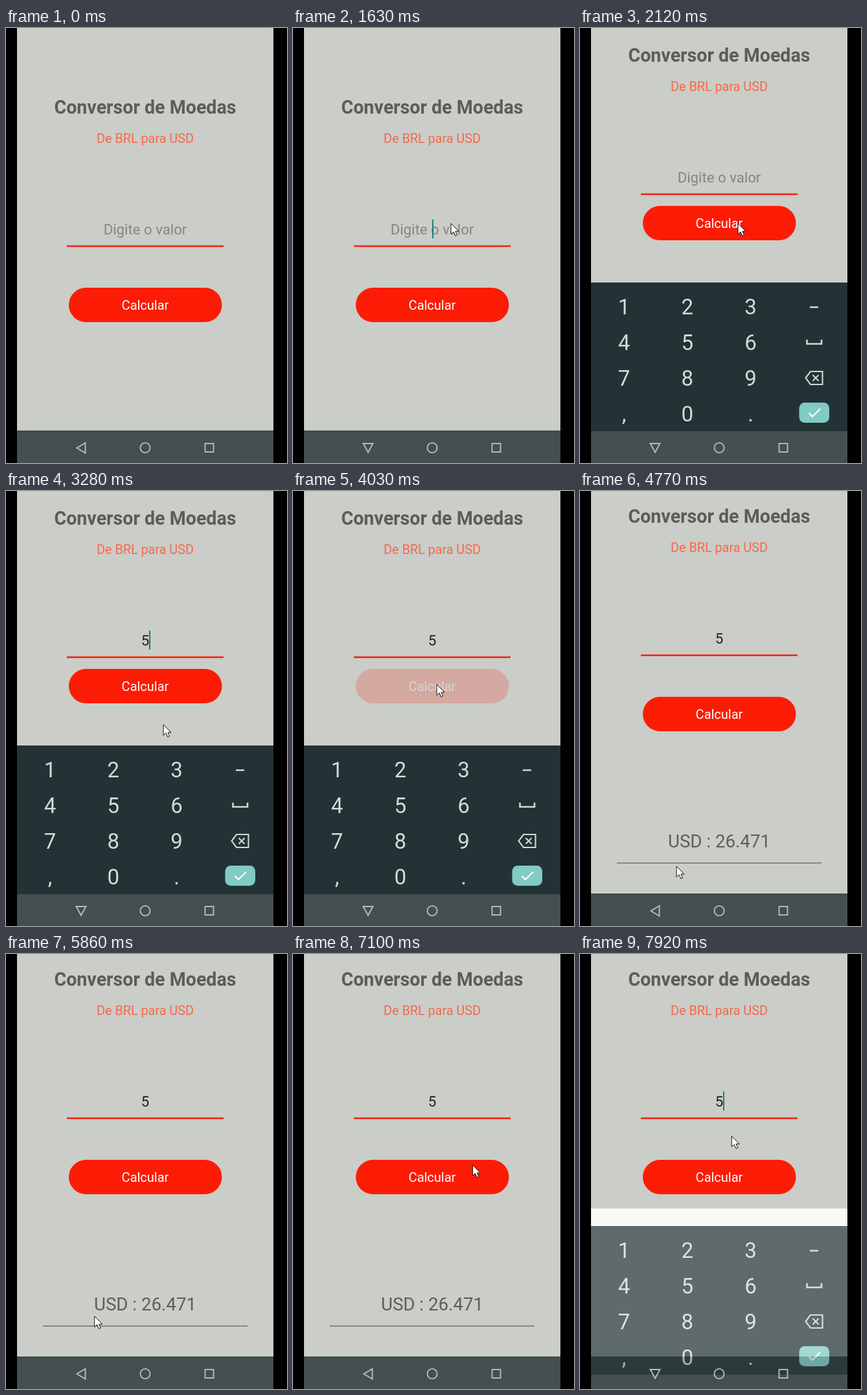
An HTML page for the animation above (7990 ms loop, 434x670 px).

```html
<!DOCTYPE html>
<html lang="pt-BR">
<head>
<meta charset="utf-8">
<title>Conversor de Moedas</title>
<style>
  html, body { margin: 0; height: 100%; overflow: hidden; background: #000; }
  svg { display: block; width: 434px; height: 670px; font-family: Roboto, sans-serif; text-anchor: middle; }
  #keys { font-size: 33px; fill: #d5dcda; }
  .icon { fill: none; stroke: #b4bdbb; stroke-width: 1.9; }
  .key { fill: none; stroke: #d0d7d5; stroke-width: 2.6; }
</style>
</head>
<body>
<svg viewBox="0 0 434 670">
  <clipPath id="phone"><rect x="17" width="396" height="670"/></clipPath>
  <g clip-path="url(#phone)">
    <rect width="434" height="670" fill="#cacdc8"/>
    <g id="form">
      <text x="215" y="132" font-size="28.6" font-weight="700" fill="#5b5d5a">Conversor de Moedas</text>
      <text x="215" y="177" font-size="19.8" fill="#f7694b">De BRL para USD</text>
      <text id="value" x="215" y="318" font-size="22.2"></text>
      <path d="M94 336H336" stroke="#f41f0d" stroke-width="2.4"/>
      <rect id="caret" y="295" width="2" height="29" fill="#17807a"/>
    </g>
    <g id="button">
      <rect x="97" width="236.5" height="53" rx="26.5" fill="#fc1c06"/>
      <text x="215" y="34" font-size="20" fill="#fff">Calcular</text>
    </g>
    <g id="result">
      <text x="215" font-size="27.7" fill="#5d5f5c">USD : 26.471</text>
      <path d="M57 24.5H373" stroke="#858784" stroke-width="2"/>
    </g>
    <rect id="blank" y="392" width="434" height="228" fill="#f8faf7"/>
    <rect y="620" width="434" height="50" fill="#434f50"/>
    <path d="M0 620.5H434" stroke="#344142"/>
    <g id="keyboard">
      <rect y="392" width="434" height="229" fill="#233335"/>
      <rect y="621" width="434" height="50" fill="#444f50"/>
      <rect id="press" x="117" y="457" width="97" height="55" rx="4" fill="#fff" opacity=".15"/>
      <g id="keys"></g>
      <path class="key" d="M355 430H368M350.5 480v6.5h22.5v-6.5"/>
      <path class="key" d="M348.5 539l7.5-10h18.5v20h-18.5zM359.5 534.5l9 9m0-9l-9 9" style="stroke-width:2.1"/>
      <rect x="338.5" y="577" width="46.5" height="31" rx="8.5" fill="#80cbc4"/>
      <path d="M353.5 593l5.5 5.5 12-12" fill="none" stroke="#fff" stroke-width="2.2"/>
    </g>
    <g class="icon">
      <path id="back"/>
      <circle cx="215" cy="646.5" r="7.6"/>
      <rect x="307.5" y="640" width="13" height="13"/>
    </g>
  </g>
  <path id="pointer" d="M0 0V16.5l4-3.6 2.8 6.2 2.7-1.2-2.7-5.8h5.2z" fill="#fff" stroke="#111"/>
</svg>
<script>
const LOOP = 7990;
const TYPED = 3000, SOLVED = 4225, CLOSING = 4260, CLOSED = 4500, REOPEN = 7835;

const el = id => document.getElementById(id);
const show = (id, on) => el(id).setAttribute('visibility', on ? 'visible' : 'hidden');
const move = (id, x, y) => el(id).setAttribute('transform', `translate(${x} ${y})`);
const ramp = (t, start, length) => Math.min(1, Math.max(0, (t - start) / length));
const smooth = k => k * k * (3 - 2 * k);
const within = (t, a, b) => t >= a && t < b;

// The pointer glides from stop to stop: leaving time, travel time, target.
const glides = [
  [110, 770, 244, 301],   // input
  [2180, 350, 170, 555],  // keypad
  [2530, 140, 173, 494],  // key 5
  [2960, 470, 265, 318],
  [3430, 190, 222, 298],  // button
  [4560, 210, 149, 578],  // result, then sweeps below it
  [4770, 110, 125, 558],
  [4880, 450, 263, 558],
  [5330, 470, 125, 558],
  [5800, 340, 263, 558],
  [6200, 450, 331, 450],
  [6650, 800, 241, 240],  // input
  [7770, 170, 234, 282]
];

function pointerAt(t) {
  let x = 348, y = 588;
  for (const [start, length, toX, toY] of glides) {
    const k = smooth(ramp(t, start, length));
    x += (toX - x) * k;
    y += (toY - y) * k;
  }
  return [x, y];
}

// The gap above the button closes while the keyboard takes up room.
function layoutAt(t) {
  const tight = within(t, 1960, CLOSED);
  const shift = t < 1960 ? 0 : t < SOLVED ? -80 : t < CLOSED ? -162 : -83;
  const button = 336 + shift + (tight ? 18 : 64.5);
  return { shift, button: Math.floor(button), result: button + (tight ? 209 : 231) };
}

function keyboardAt(t) {
  if (within(t, CLOSING, CLOSED)) {
    const gone = ramp(t, CLOSING, CLOSED - CLOSING);
    return { opacity: 1 - gone, drop: Math.round(gone * 53) };
  }
  const hidden = (1 - ramp(t, t < CLOSING ? 1720 : REOPEN, 250)) ** 3;
  return { opacity: 1 - hidden, drop: Math.round(hidden * 96) };
}

function buttonOpacity(t) {
  return 1 - .8 * ramp(t, 3830, 150) + .8 * smooth(ramp(t, 4220, 450));
}

function caretAt(t) {
  const blink = since => Math.floor((t - since) / 515) % 2 === 0;
  if (within(t, 1420, SOLVED)) return blink(t < TYPED ? 1420 : 3100);
  return t >= 7550;
}

function draw(t) {
  const typed = t >= TYPED;
  const layout = layoutAt(t);
  move('form', 0, layout.shift);
  move('button', 0, layout.button);
  move('result', 0, layout.result);
  el('button').setAttribute('opacity', buttonOpacity(t));
  show('result', t >= SOLVED);

  el('value').textContent = typed ? '5' : 'Digite o valor';
  el('value').setAttribute('fill', typed ? '#222' : '#848683');
  el('caret').setAttribute('x', typed ? 221 : 215);
  show('caret', caretAt(t));

  const { opacity, drop } = keyboardAt(t);
  show('blank', opacity > 0);
  el('keyboard').setAttribute('opacity', opacity);
  move('keyboard', 0, drop);
  show('press', within(t, 2810, 3030));

  const open = within(t, 1560, SOLVED) || t >= 7700;
  el('back').setAttribute('d', open ? 'M108.5 640h15l-7.5 13.5z' : 'M122.5 639v15.5l-13-7.75z');

  move('pointer', ...pointerAt(t));
  show('pointer', t >= 110);
}

el('keys').innerHTML = ['123', '456', '789', ',0.'].map((row, r) =>
  [...row].map((key, c) => `<text x="${68 + c * 97.8}" y="${441 + r * 54.9}">${key}</text>`).join('')
).join('');

const begin = performance.now();
function tick() {
  draw((performance.now() - begin) % LOOP);
  requestAnimationFrame(tick);
}
tick();
</script>
</body>
</html>
```
